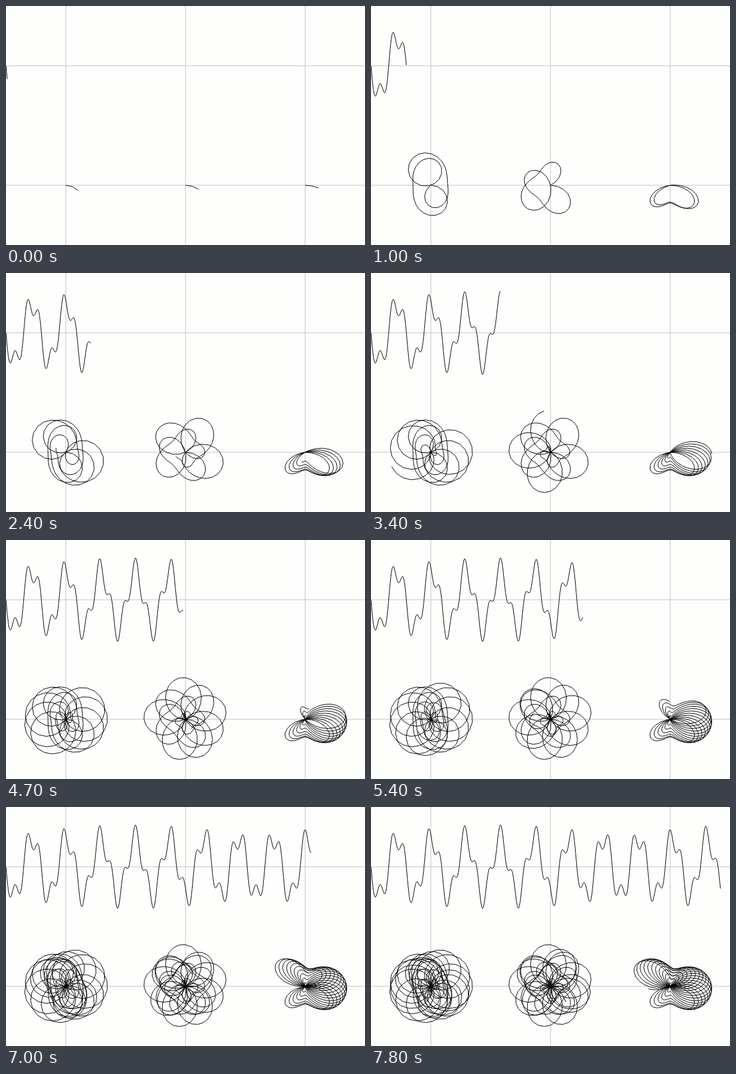
An HTML page that plays this animation: 600x400 px, repeating every 7.9 s.

```html
<!DOCTYPE html>
<html lang="en">
<head>
<meta charset="utf-8">
<title>Winding a wave</title>
<style>
  html, body { margin: 0; width: 100%; height: 100%; overflow: hidden; background: #fefefd; }
  svg { display: block; width: 600px; height: 400px; }
  path { fill: none; stroke: #000; stroke-width: 1; stroke-miterlimit: 10; }
  .grid { stroke: #c0c0c0; }
</style>
</head>
<body>
<svg viewBox="0 0 600 400">
  <path class="grid" d="M0 100H600M0 300H600M100 0V400M300 0V400M500 0V400"/>
  <path id="wave"/>
  <path id="fast"/>
  <path id="medium"/>
  <path id="slow"/>
</svg>
<script>
  const LOOP = 7900, STEP = 100;
  // Pen progress: [step, samples drawn], linear in between
  const PACE = [[0, 2], [9, 59], [16, 95], [23, 142], [33, 216], [46, 296], [61, 421], [72, 543], [77, 584]];

  const signal = i => 50 * Math.sin(0.109 * i) + 20 * Math.sin(0.312 * i);
  const winding = (cx, speed) => i => [
    cx + signal(i) * Math.cos(speed * i),
    300 + signal(i) * Math.sin(speed * i)
  ];

  const curves = {
    wave: i => [i, 100 + signal(i)],
    fast: winding(100, 0.202),
    medium: winding(300, 0.152),
    slow: winding(500, 0.102)
  };

  const points = {};
  for (const id in curves) {
    points[id] = Array.from({ length: 600 }, (_, i) =>
      curves[id](i).map(v => v.toFixed(2)).join(' '));
  }

  function samplesAt(step) {
    const k = Math.max(1, PACE.findIndex(p => p[0] >= step));
    const [s0, n0] = PACE[k - 1], [s1, n1] = PACE[k];
    return Math.round(n0 + (n1 - n0) * (step - s0) / (s1 - s0));
  }

  let shown = -1;
  function draw(now) {
    // The first picture holds for two steps
    const step = Math.max(0, Math.floor(now % LOOP / STEP) - 1);
    if (step !== shown) {
      shown = step;
      const count = samplesAt(step) + 1;
      for (const id in points) {
        document.getElementById(id).setAttribute('d', 'M' + points[id].slice(0, count).join('L'));
      }
    }
  }

  const start = performance.now();
  function tick() {
    draw(performance.now() - start);
    requestAnimationFrame(tick);
  }
  tick();
</script>
</body>
</html>
```
